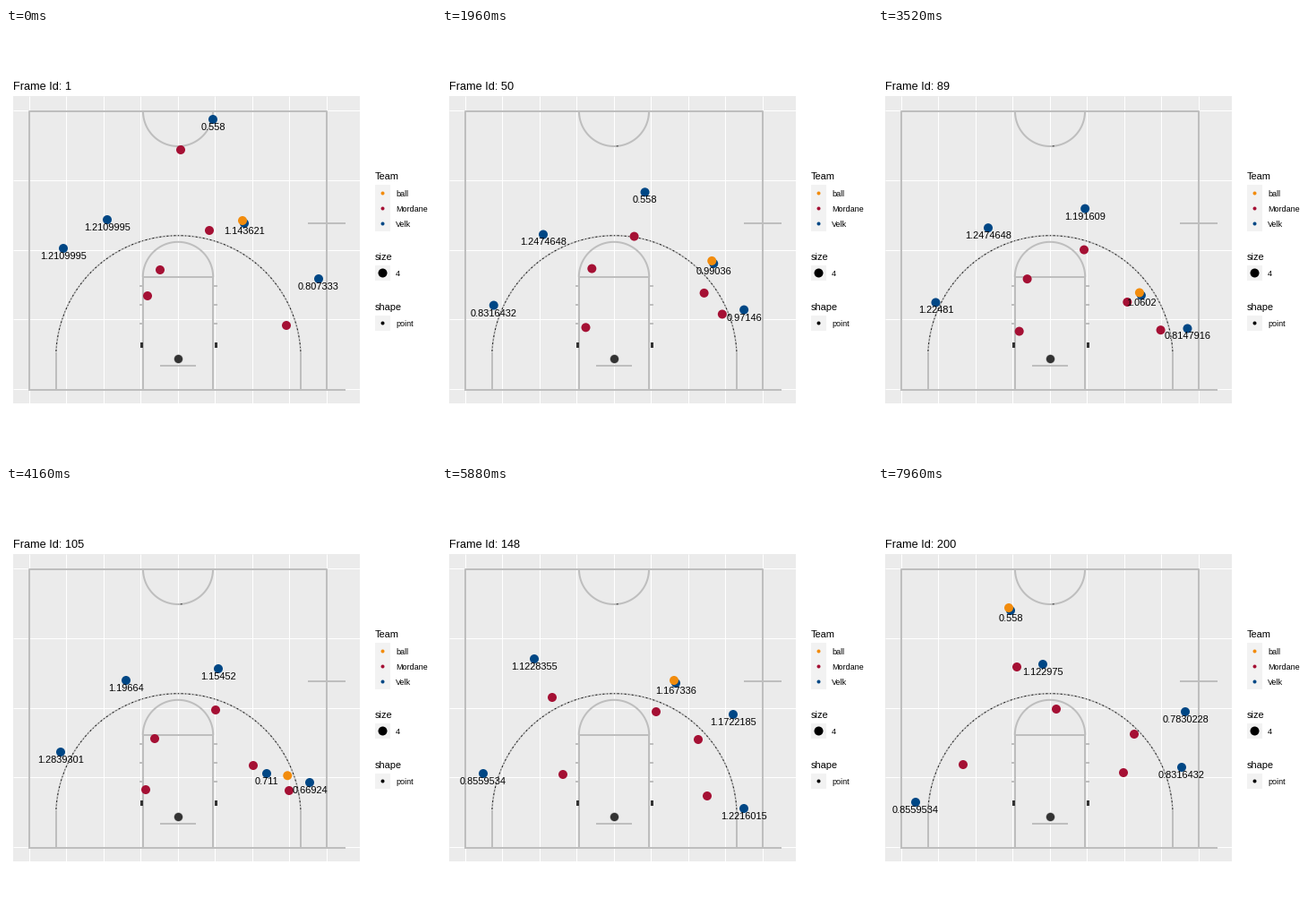
Animation of 480 by 480 pixels, one loop 8 s. Source, as a matplotlib script:

```python
import numpy as np
import matplotlib.pyplot as plt
from matplotlib.animation import FuncAnimation
from matplotlib.patches import Rectangle

SIZE, DPI, COUNT, STEP = 480, 80, 200, 40
PX = 72 / DPI  # points per pixel
GREY, DARK = "#BEBEBE", "#333333"
ORANGE, RED, BLUE = "#F28C0D", "#A51034", "#004785"

plt.rcParams["font.family"] = "Liberation Sans"
fig = plt.figure(figsize=(SIZE / DPI, SIZE / DPI), dpi=DPI, facecolor="white")
ax = fig.add_axes([0, 0, 1, 1])
ax.set_xlim(0, SIZE)
ax.set_ylim(SIZE, 0)
ax.axis("off")


def line(xs, ys, color=GREY, width=2, z=2, **kw):
    ax.plot(xs, ys, color=color, lw=width * PX, zorder=z,
            solid_capstyle="butt", dash_capstyle="butt", **kw)


def box(x, y, w, h, color, z=1):
    ax.add_patch(Rectangle((x, y), w, h, fc=color, lw=0, zorder=z))


def text(x, y, s, size=11, **kw):
    return ax.text(x, y, s, fontsize=size * PX, va="baseline", color="black",
                   zorder=9, **kw)


def dots(xy, radius, colors, z=6):
    return ax.scatter(*np.transpose(xy), s=(2 * radius * PX) ** 2, c=colors,
                      linewidths=0, zorder=z)


def arc(cx, cy, r, start, end, **kw):
    a = np.radians(np.linspace(start, end, 120))
    line(cx + r * np.cos(a), cy - r * np.sin(a), **kw)


def draw_court():
    box(8, 76, 387, 343, "#EBEBEB", 0)
    for x in np.linspace(25.5, 357.5, 9):
        line([x, x], [76, 419], "white", 1, 1)
    for y in np.linspace(92.4, 403, 5):
        line([8, 395], [y, y], "white", 1, 1)

    line([26, 26, 358, 358], [404, 93, 93, 404])
    line([25, 379], [404, 404])
    line([337, 379], [218, 218])
    line([153, 153, 231, 231], [404, 278, 278, 404])
    arc(192, 278, 39.2, 0, 180)
    arc(192, 93, 39, 180, 360)
    arc(192, 93, 39, 274, 277, color=DARK, width=1, z=3)

    # three-point line
    for x in (56, 329):
        line([x, x], [362, 404])
    arc(192.4, 368.4, 136.7, 3, 177, width=1.6)
    arc(192.4, 368.4, 136.7, 3, 177, color="black", width=0.9, z=3,
        dashes=(2, 3, 1, 3))

    for left in (149, 232):
        for y in (288, 309, 330):
            line([left, left + 4], [y, y])
        box(left + 0.5, 350.5, 3, 6, DARK, 3)
    line([172, 212], [377, 377])
    dots([(192, 368.6)], 5.2, GREY, 3)
    dots([(192, 368.6)], 4.6, DARK, 4)


def legend(title, base, top, rows):
    text(412, base, title)
    for i, (label, color, radius) in enumerate(rows):
        y = top + 17.28 * i
        box(412, y, 17.28, 17.28, "#F2F2F2")
        dots([(420, y + 8.4)], radius, color)
        text(435, y + 12.2, label, 9)


draw_court()
legend("Team", 169, 175.3, [("ball", ORANGE, 2), ("Mordane", RED, 2),
                            ("Velk", BLUE, 2)])
legend("size", 259, 264.6, [("4", "black", 5)])
legend("shape", 315, 320.6, [("point", "black", 2)])


def smooth(t, p):
    """Value on every frame of a cubic that never overshoots its points."""
    at = np.arange(1, COUNT + 1)
    h = np.diff(t)
    d = np.diff(p) / h
    m = np.zeros(len(t))
    m[0], m[-1] = d[0], d[-1]
    for i in range(1, len(d)):
        if d[i - 1] * d[i] > 0:
            m[i] = 2 * d[i - 1] * d[i] / (d[i - 1] + d[i])
    k = np.clip(np.searchsorted(t, at, side="right") - 1, 0, len(d) - 1)
    u, w = (at - t[k]) / h[k], h[k]
    return ((1 + 2 * u) * (1 - u) ** 2 * p[k] + u * (1 - u) ** 2 * w * m[k]
            + u * u * (3 - 2 * u) * p[k + 1] + u * u * (u - 1) * w * m[k + 1])


def track(times, *points):
    x, y = np.array(points, float).T
    return np.stack([smooth(times, x), smooth(times, y)], axis=1)


# The attack changes direction at these frames; the defence shifts less often
CUTS = np.array([1, 27, 74, 105, 148, 174, 200])
SHIFTS = CUTS[[0, 1, 3, 4, 6]]

corner = track(CUTS, (64, 246), (50, 297), (66, 315), (61, 297), (46, 321),
               (45, 341), (42, 353))
wing = track(CUTS, (113, 214), (113, 232), (113, 227), (134, 217), (103, 193),
             (133, 184), (148, 139))
guard = track(CUTS, (231, 102), (226, 157), (228, 199), (237, 204), (261, 220),
              (238, 210), (184, 199))
driver = track(CUTS, (266, 218), (306, 248), (298, 279), (291, 321),
               (337, 360), (339, 329), (339, 314))
forward = track(CUTS, (349, 280), (326, 288), (349, 337), (339, 331),
                (325, 255), (342, 247), (343, 252))
attack = [corner, wing, guard, driver, forward]

defence = [
    track(SHIFTS, (195, 136), (205, 218), (234, 250), (239, 252), (199, 249)),
    track(SHIFTS, (227, 226), (297, 286), (276, 312), (296, 346), (274, 320)),
    track(SHIFTS, (172, 270), (168, 265), (166, 282), (123, 236), (155, 202)),
    track(SHIFTS, (158, 299), (161, 330), (156, 339), (135, 322), (95, 311)),
    track(SHIFTS, (313, 332), (312, 314), (316, 340), (286, 283), (286, 277)),
]


def passed(ball, receiver, start, end):
    u = np.clip((np.arange(1, COUNT + 1) - start) / (end - start), 0, 1)
    return ball + u[:, None] * (receiver - ball)


ball = passed(driver, forward, 95, 114)
ball = passed(ball, guard, 124, 138)
ball = passed(ball, wing, 180, 192) + (-2, -3)

# Shot value of each attacker after each cut
values = [line_.split() for line_ in (
    "1.2109995 0.8316432 1.22481 1.2839301 0.8559534 0.8559534 0.8559534",
    "1.2109995 1.2474648 1.2474648 1.19664 1.1228355 1.134972 0.558",
    "0.558 0.558 1.191609 1.15452 1.167336 1.17504 1.122975",
    "1.143621 0.99036 1.0602 0.711 1.2216015 0.8351772 0.8316432",
    "0.807333 0.97146 0.8147916 0.66924 1.1722185 0.7830228 0.7830228",
)]
switches = (CUTS[:-1] + CUTS[1:]) / 2

tracks = np.stack(defence + attack + [ball], axis=1)
marks = dots(tracks[0], 5, [RED] * 5 + [BLUE] * 5 + [ORANGE])
labels = [text(0, 0, "", ha="center") for _ in attack]
title = text(8, 69, "", 12.8)


def update(i):
    marks.set_offsets(tracks[i])
    zone = np.searchsorted(switches, i + 1)
    for label, value, (x, y) in zip(labels, values, tracks[i, 5:10]):
        label.set_text(value[zone])
        label.set_position((x, y + 12))
    title.set_text(f"Frame Id: {i + 1}")
    return [marks, title, *labels]


anim = FuncAnimation(fig, update, frames=COUNT, interval=STEP, repeat=True,
                     repeat_delay=0, blit=False)
plt.show()
```
